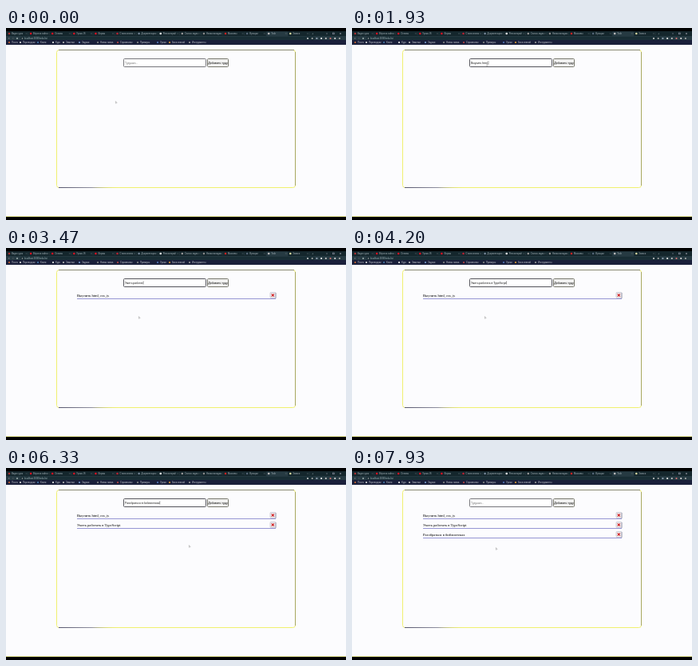
An HTML page with a canvas that plays this animation: 426x240 px, repeating every 8 s.

```html
<!DOCTYPE html>
<html lang="ru">
<head>
<meta charset="utf-8">
<title>Todo</title>
<style>
html, body { margin: 0; width: 100%; height: 100%; overflow: hidden; background: #fcfcfe; }
canvas { display: block; width: 426px; height: 240px; }
</style>
</head>
<body>
<canvas id="stage"></canvas>
<script>
const LOOP = 8000;
const SANS = '"Liberation Sans", Arial, sans-serif';
const SERIF = '"Liberation Serif", "Times New Roman", serif';
const PAPER = '#fcfcfe';
const canvas = document.getElementById('stage');
const ratio = window.devicePixelRatio || 1;
canvas.width = 426 * ratio;
canvas.height = 240 * ratio;
const ctx = canvas.getContext('2d');
ctx.scale(ratio, ratio);

// Each entry is typed from start to end, then moves into the list at add.
const todos = [
  { text: 'Выучить html, css, js', start: 1350, end: 2350, add: 2560 },
  { text: 'Уметь работать в TypeScript', start: 2900, end: 4100, add: 4550 },
  { text: 'Разобраться в библиотеках', start: 5150, end: 6270, add: 6750 }
];
// Pointer stops: time, x, y
const pointerPath = [
  [0, 138, 93], [200, 138, 93], [930, 159, 46], [1400, 159, 46], [2300, 175, 47],
  [2760, 175, 47], [3400, 167, 87], [4400, 167, 87], [4850, 200, 72],
  [5050, 200, 72], [5600, 230, 98], [6800, 230, 98], [7500, 181, 101], [8000, 181, 101]
];
const tabs = ['Видео урок', 'Вёрстка сайта', 'Основы', 'Уроки JS', 'Формы', 'Стили кнопок',
  'Документация', 'Репозиторий', 'Список задач', 'Новая вкладка', 'Массивы', 'Функции', 'Todo', 'Записи'];
const tabIcons = ['#a33', '#d12', '#d12', '#d12', '#d12', '#b23', '#789', '#eee',
  '#999', '#888', '#c22', '#567', '#bbb', '#d8d8a0'];
const bookmarks = [[6, 'Почта', '#c63'], [20, 'Переводчик', '#ddd'], [42, 'Книги', '#47a'],
  [61, 'Курс', '#eee'], [74, 'Заметки', '#bbb'], [94, 'Задачи', '#79c'],
  [117, 'Новая папка', '#888'], [142, 'Справочник', '#b44'], [167, 'Примеры', '#888'],
  [192, 'Уроки', '#57b'], [207, 'База знаний', '#d93'], [232, 'Инструменты', '#999']];

function rect(x, y, w, h, color) {
  ctx.fillStyle = color;
  ctx.fillRect(x, y, w, h);
}

function rounded(x, y, w, h, r, fill, stroke, width = 1) {
  ctx.beginPath();
  ctx.roundRect(x, y, w, h, r);
  if (fill) { ctx.fillStyle = fill; ctx.fill(); }
  if (stroke) { ctx.strokeStyle = stroke; ctx.lineWidth = width; ctx.stroke(); }
}

function line(x1, y1, x2, y2, color, width = 1) {
  ctx.beginPath();
  ctx.moveTo(x1, y1);
  ctx.lineTo(x2, y2);
  ctx.strokeStyle = color;
  ctx.lineWidth = width;
  ctx.stroke();
}

function dot(x, y, r, color) {
  ctx.beginPath();
  ctx.arc(x, y, r, 0, Math.PI * 2);
  ctx.fillStyle = color;
  ctx.fill();
}

function label(text, x, y, size, color, family = SANS) {
  ctx.font = `${size}px ${family}`;
  ctx.fillStyle = color;
  ctx.fillText(text, x, y);
}

function cross(x, y, r, color, width) {
  line(x - r, y - r, x + r, y + r, color, width);
  line(x - r, y + r, x + r, y - r, color, width);
}

function drawBrowser() {
  rect(0, 0, 426, 4, '#000');
  rect(0, 4, 426, 6, '#14262c');
  rect(0, 10, 426, 5, '#263a42');
  rect(0, 15, 426, 6, '#1a1f3a');

  tabs.forEach((name, i) => {
    const x = 2 + i * 27.1;
    if (name === 'Todo') rounded(x - 1, 4.4, 27, 6, 1, '#263a42');
    dot(x + 2, 7, 1.3, tabIcons[i]);
    label(name, x + 5, 8, 2.7, '#a8b4ba');
    cross(x + 23.6, 7, 0.6, '#85949b', 0.35);
    line(x + 25.8, 5.5, x + 25.8, 9, '#4b5d65', 0.3);
  });
  label('+', 383, 8.3, 4, '#9aa');
  line(401, 7, 403, 7, '#aab', 0.5);
  ctx.strokeRect(409.5, 6, 1.8, 1.8);
  cross(419, 7, 1, '#aab', 0.5);

  label('‹', 3, 14.3, 5, '#bbb');
  label('›', 8, 14.3, 5, '#777');
  dot(14, 13, 1.1, '#9aa');
  rounded(18, 10.8, 369, 4, 2, '#182d34');
  dot(20.5, 13, 0.8, '#aaa');
  label('localhost:3000/todo-list', 23, 14, 2.8, '#a8bbc1');
  ['#ccc', '#aaa', '#9ab', '#eee', '#ccc', '#d77', '#ddd', '#aaa'].forEach((color, i) =>
    dot(378 + i * 5.7, 13, 1.1, color));

  for (const [x, name, color] of bookmarks) {
    dot(x - 2, 18, 1.1, color);
    label(name, x + 1, 19, 2.8, '#c2c4cc');
  }
  rect(0, 235, 426, 1, '#eeee9a');
  rect(0, 236, 426, 4, '#000');
}

function drawPanel() {
  rounded(63.5, 27.5, 299, 172, 3, PAPER, '#f0f070');
  line(66, 27.5, 361, 27.5, '#8a8a72');
  line(362.5, 30, 362.5, 197, '#a8a860');
  const edge = ctx.createLinearGradient(65, 0, 142, 0);
  edge.addColorStop(0, '#55556c');
  edge.addColorStop(0.55, '#9090a0');
  edge.addColorStop(1, '#f0f07000');
  line(66, 199.5, 142, 199.5, edge);
}

function drawForm(t) {
  const typing = todos.find(item => t >= item.start && t < item.add);
  rounded(147.5, 38.5, 103, 10, 1, '#fff', typing ? '#55555c' : '#77777c');
  if (typing) {
    const progress = Math.min(1, (t - typing.start) / (typing.end - typing.start));
    const value = typing.text.slice(0, Math.ceil(progress * typing.text.length));
    label(value, 149, 44.5, 3.4, '#111');
    const caret = 149.3 + ctx.measureText(value).width;
    line(caret, 41.2, caret, 45.5, '#222', 0.4);
  } else {
    label('Тудушка...', 149, 44.5, 3.4, '#777');
  }
  rounded(252.5, 38.5, 26, 10, 1, '#f1f1f0', '#77776c');
  ctx.textAlign = 'center';
  label('Добавить туду', 265.5, 44.7, 3.65, '#000');
  ctx.textAlign = 'left';
}

function drawItem(text, y) {
  label(text, 89, y + 5.4, 4.6, '#000', SERIF);
  line(89, y + 8, 338, y + 8, '#9696d4');
  rounded(331, y, 7, 7, 0.8, '#ececf0', '#b8b8c4', 0.6);
  line(338, y + 0.5, 338, y + 7.5, '#8c8ca0', 0.7);
  cross(334.3, y + 3.5, 1.6, '#d01818', 1.1);
}

function drawPointer(t) {
  const i = pointerPath.findIndex((stop, n) => n && t <= stop[0]);
  const [t0, x0, y0] = pointerPath[i - 1];
  const [t1, x1, y1] = pointerPath[i];
  const p = (t - t0) / (t1 - t0);
  const ease = p * p * (3 - 2 * p);
  const x = x0 + (x1 - x0) * ease;
  const y = y0 + (y1 - y0) * ease;
  const overInput = x > 148 && x < 251 && y > 38 && y < 49;
  if (overInput) {
    line(x, y - 1.8, x, y + 1.8, '#555', 0.5);
    line(x - 0.7, y + 1.8, x + 0.7, y + 1.8, '#555', 0.4);
    return;
  }
  ctx.beginPath();
  ctx.moveTo(x - 0.6, y - 1.4);
  ctx.lineTo(x - 0.6, y + 1.2);
  ctx.lineTo(x + 1.1, y + 0.5);
  ctx.closePath();
  ctx.fillStyle = '#fff';
  ctx.fill();
  ctx.strokeStyle = '#666';
  ctx.lineWidth = 0.35;
  ctx.stroke();
}

function draw(now) {
  const t = now % LOOP;
  rect(0, 0, 426, 240, PAPER);
  drawBrowser();
  drawPanel();
  drawForm(t);
  todos.forEach((item, i) => {
    if (t >= item.add) drawItem(item.text, 55.5 + i * 12);
  });
  drawPointer(t);
  requestAnimationFrame(draw);
}

requestAnimationFrame(draw);
</script>
</body>
</html>
```
